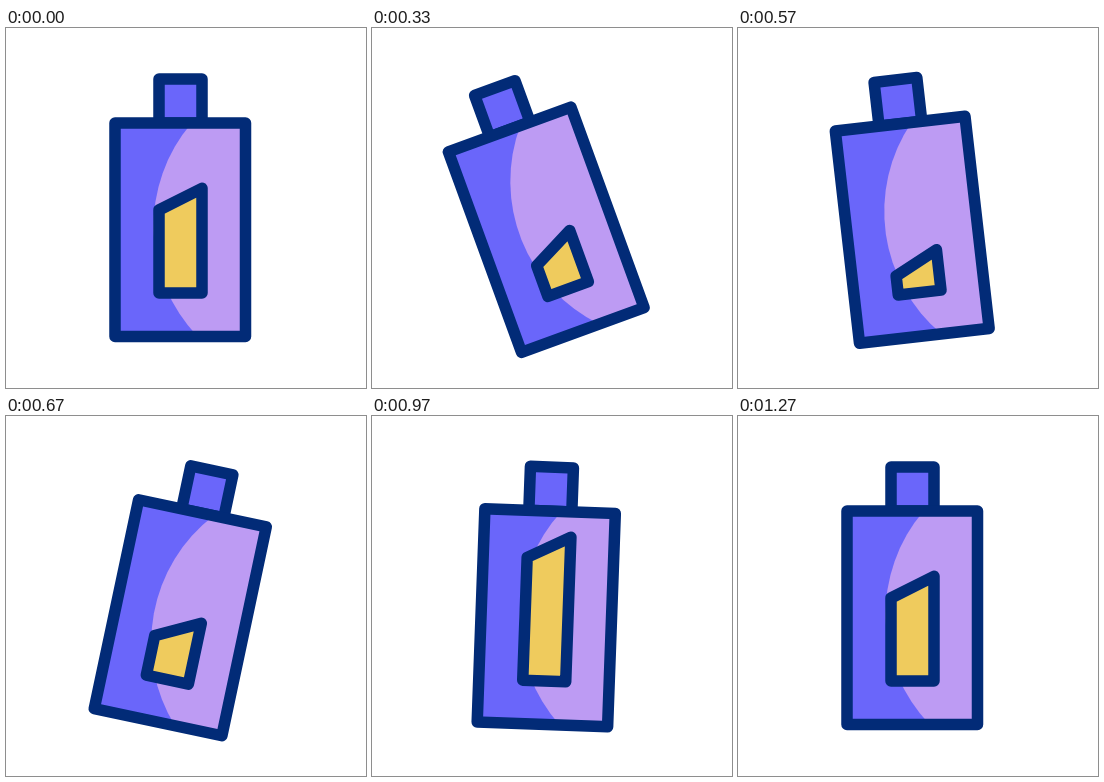
Write an HTML page that moves like this. It is 360 by 360 pixels and loops after 1670 ms.

```html
<!DOCTYPE html>
<html lang="en">
<head>
<meta charset="utf-8">
<title>Swinging bottle</title>
<style>
  html, body { margin: 0; width: 100%; height: 100%; overflow: hidden; background: #fff; }
  svg { display: block; width: 100vw; height: 100vh; }
  .line { stroke: #022b77; stroke-width: 11.5; stroke-linejoin: round; }
  .blue { fill: #6a66fa; }
  .shade { fill: #bd9bf3; }
  .level { fill: #efcb5d; }
</style>
</head>
<body>
<svg viewBox="0 0 360 360">
  <g id="bottle">
    <rect class="blue line" x="153" y="51" width="43" height="44"/>
    <rect class="blue" x="109" y="95" width="130.5" height="213.5"/>
    <path class="shade" d="M185.6 95A159.5 159.5 0 0 0 191.5 308.5H239.5V95Z"/>
    <rect class="line" fill="none" x="109" y="95" width="130.5" height="213.5"/>
    <path id="level" class="level line"/>
  </g>
</svg>
<script>
  const LOOP = 1670;
  const LAST_STEP = 38;

  // [step, value] pairs, 30 steps per second
  const ANGLE = [[0, 0], [14, -25], [20, 12], [25, -6], [30, 3], [38, 0]];
  const DROP = [[0.4, 0], [14.1, 64], [17, 64], [27.4, -42.5], [38, 0]];

  const bottle = document.getElementById('bottle');
  const level = document.getElementById('level');

  const ease = u => u * u * (3 - 2 * u);

  function valueAt(keys, step) {
    if (step <= keys[0][0]) return keys[0][1];
    for (let i = 1; i < keys.length; i++) {
      const [s0, v0] = keys[i - 1];
      const [s1, v1] = keys[i];
      if (step <= s1) return v0 + (v1 - v0) * ease((step - s0) / (s1 - s0));
    }
    return keys[keys.length - 1][1];
  }

  // Steps last 30, 40 and 30 ms in turn, then the bottle rests.
  function stepAt(ms) {
    const rest = ms % 100;
    const step = 3 * Math.floor(ms / 100) + (rest >= 70 ? 2 : rest >= 30 ? 1 : 0);
    return Math.min(step, LAST_STEP);
  }

  function draw(now) {
    const step = stepAt(now % LOOP);
    const drop = valueAt(DROP, step);
    bottle.setAttribute('transform', `rotate(${valueAt(ANGLE, step)} 174.25 201.75)`);
    level.setAttribute('d', `M153 ${182 + drop}L196 ${160.3 + drop}V265H153Z`);
  }

  function tick() {
    draw(performance.now());
    requestAnimationFrame(tick);
  }
  tick();
</script>
</body>
</html>
```
